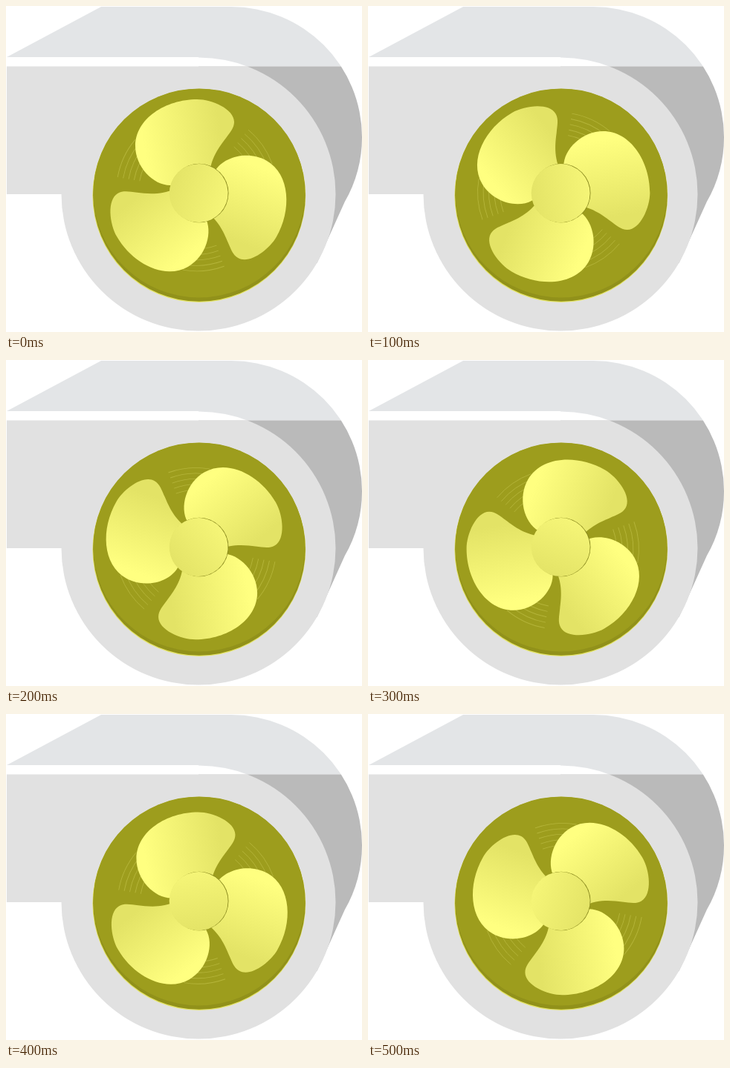
Animation of 479x440 px, one loop 600 ms. Source, as an HTML page with a canvas:

```html
<!DOCTYPE html>
<html lang="en">
<head>
<meta charset="utf-8">
<title>Blower</title>
<style>
html, body { margin: 0; width: 100%; height: 100%; overflow: hidden; background: #fff; }
canvas { display: block; }
</style>
</head>
<body>
<canvas id="stage" width="479" height="440"></canvas>
<script>
const ctx = document.getElementById('stage').getContext('2d');
const TAU = Math.PI * 2;
const rad = deg => deg * Math.PI / 180;

const STEP = 100;
const TURNS = [0, 30, 60, 90, 120, 180]; // degrees, counterclockwise
const AXLE = { x: 259.2, y: 252.6 };
const ROTOR = { x: 256.6, y: 249.8 };    // slightly off the axle, so it wobbles
const FRONT = { x: 259, y: 254, r: 184.5 };
const BACK = { x: 303, y: 177, r: 176 };
const LID_Y = 81.5;

const blade = new Path2D(
  'M274 228 C275 206 287 190 295 179.5 C301 171 307 165 307 156.5 ' +
  'C307 139 277 126 257 126 C215 126 174 152 174 189 ' +
  'C174 217 198 242 221 242 L240 245 Z');

function oval(x, y, rx, ry, fill) {
  ctx.beginPath();
  ctx.ellipse(x, y, rx, ry, 0, 0, TAU);
  ctx.fillStyle = fill;
  ctx.fill();
}

function blend(x0, y0, x1, y1, from, to) {
  const g = ctx.createLinearGradient(x0, y0, x1, y1);
  g.addColorStop(0, from);
  g.addColorStop(1, to);
  return g;
}

function spin(center, deg) {
  ctx.translate(center.x, center.y);
  ctx.rotate(rad(deg));
  ctx.translate(-center.x, -center.y);
}

// Fill a shape in one colour above the lid line and another below it.
function fillSplit(path, above, below) {
  [[0, LID_Y, above], [LID_Y, 440, below]].forEach(([top, bottom, color]) => {
    ctx.save();
    ctx.beginPath();
    ctx.rect(0, top, 479, bottom - top);
    ctx.clip();
    ctx.fillStyle = color;
    ctx.fill(path);
    ctx.restore();
  });
}

function drawHousing() {
  const tangent = Math.atan2(FRONT.x - BACK.x, BACK.y - FRONT.y) + Math.PI;
  const back = new Path2D();
  back.moveTo(1, 69);
  back.lineTo(128, 1);
  back.arc(BACK.x, BACK.y, BACK.r, -Math.PI / 2, tangent);
  back.arc(FRONT.x, FRONT.y, FRONT.r, tangent, tangent + 0.01);
  back.lineTo(FRONT.x, FRONT.y);
  back.lineTo(FRONT.x, 69);
  back.closePath();
  fillSplit(back, '#e3e5e7', '#bababa');

  const front = new Path2D();
  front.moveTo(1, 69.3);
  front.lineTo(FRONT.x, 69.3);
  front.arc(FRONT.x, FRONT.y, FRONT.r, -Math.PI / 2, Math.PI);
  front.lineTo(1, 254);
  front.closePath();
  fillSplit(front, '#fff', '#e1e1e1');
}

function drawWell() {
  oval(259.8, 255.9, 143.4, 144.2, '#e3e364');
  oval(260, 255.3, 142.8, 143.4, '#91911a');
  oval(259.8, 252.4, 142.3, 141, '#9d9d1d');
}

function eachThird(draw) {
  for (let i = 0; i < 3; i++) {
    ctx.save();
    spin(ROTOR, i * 120);
    draw();
    ctx.restore();
  }
}

function drawStreaks() {
  ctx.strokeStyle = '#b5b53a';
  ctx.lineWidth = 0.9;
  for (let r = 78; r <= 108; r += 7.5) {
    ctx.beginPath();
    ctx.arc(ROTOR.x, ROTOR.y, r, rad(-50), rad(-20));
    ctx.stroke();
  }
}

function drawBlade() {
  ctx.fillStyle = blend(290, 175, 186, 192, '#e3e366', '#ffff80');
  ctx.fill(blade);
}

function drawRotor(turn) {
  ctx.save();
  spin(AXLE, -turn);
  eachThird(drawStreaks);
  eachThird(drawBlade);
  ctx.restore();

  oval(AXLE.x + 0.8, AXLE.y - 0.1, 39.5, 39.7, '#85851a');
  ctx.save();
  spin(AXLE, 20 - turn);
  const { x, y } = AXLE;
  oval(x, y, 39.5, 39.5, blend(x - 39, y, x + 39, y, '#e4e467', '#f5f577'));
  ctx.restore();
}

function frame() {
  const step = Math.floor(performance.now() / STEP) % TURNS.length;
  ctx.fillStyle = '#fff';
  ctx.fillRect(0, 0, 479, 440);
  drawHousing();
  drawWell();
  drawRotor(TURNS[step]);
  requestAnimationFrame(frame);
}
frame();
</script>
</body>
</html>
```
